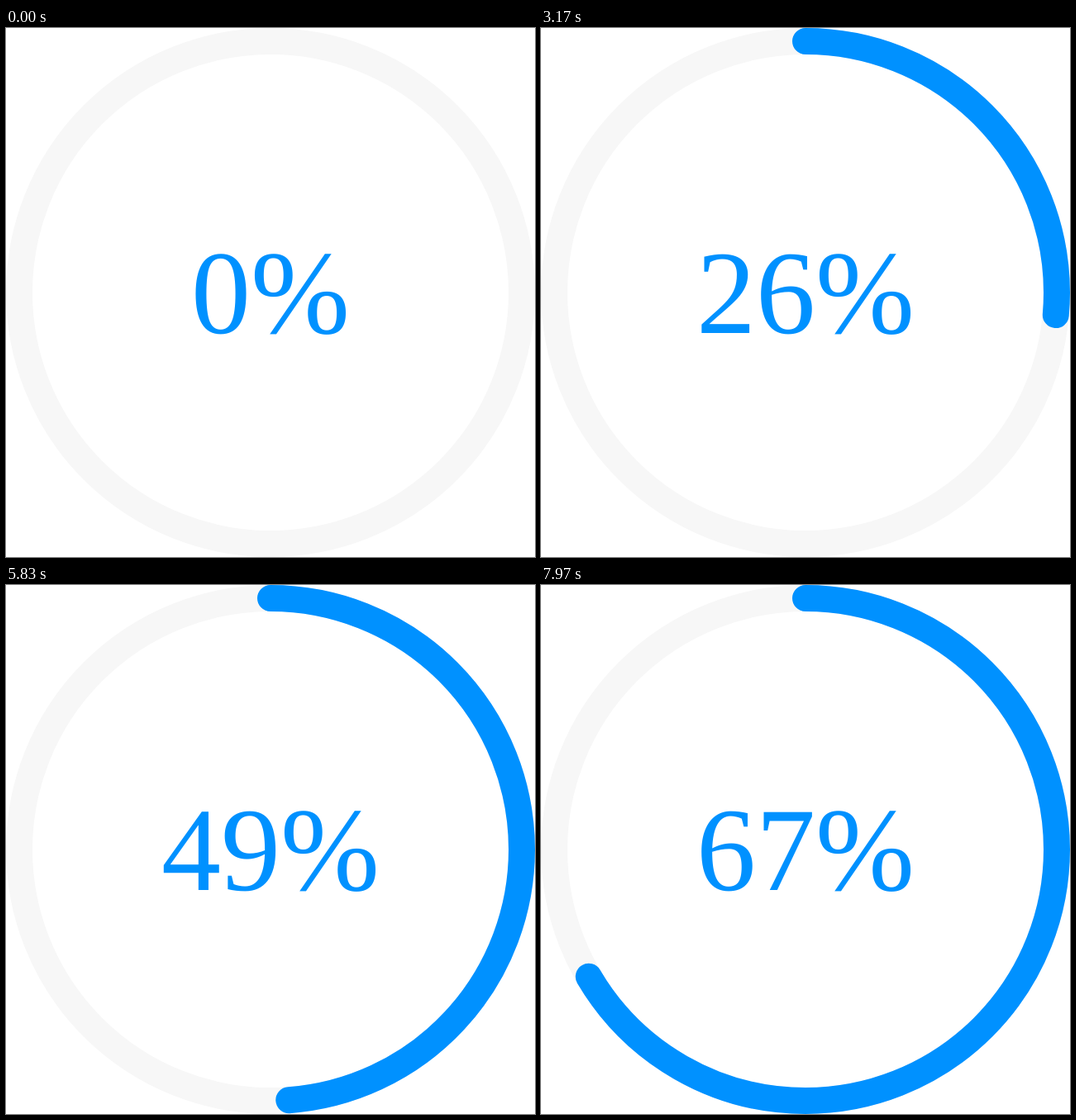
An HTML page for the animation above (8000 ms loop, 640x640 px).

```html
<!DOCTYPE html>
<html lang="en">
<head>
<meta charset="utf-8">
<title>Progress ring</title>
<style>
  html, body { margin: 0; height: 100%; overflow: hidden; background: #fff; }
  svg { display: block; width: 100%; height: 100%; }
  .ring { fill: none; stroke-width: 32; }
  .track { stroke: #f7f7f7; }
  .bar { stroke: #0091ff; stroke-linecap: round; }
  text {
    fill: #0091ff;
    font: 144px "Liberation Serif", serif;
    text-anchor: middle;
    text-rendering: geometricPrecision;
  }
</style>
</head>
<body>
<svg viewBox="0 0 640 640">
  <circle class="ring track" cx="320" cy="320" r="304"/>
  <path class="ring bar" id="bar" pathLength="100" visibility="hidden"
        d="M320 16A304 304 0 0 1 320 624A304 304 0 0 1 320 16"/>
  <text id="label" x="320" y="368.6">0%</text>
</svg>
<script>
  const LOOP = 8000;
  const LAST_STEP = 299;                   // the step at which the ring would be full
  const BEAT = 200;                        // five uneven steps per beat
  const OFFSETS = [0, 30, 70, 130, 170];

  const bar = document.getElementById('bar');
  const label = document.getElementById('label');

  function stepAt(time) {
    const inBeat = time % BEAT;
    const passed = OFFSETS.filter(offset => offset <= inBeat).length;
    return Math.floor(time / BEAT) * OFFSETS.length + passed - 1;
  }

  function draw() {
    const percent = stepAt(performance.now() % LOOP) / LAST_STEP * 100;
    bar.setAttribute('visibility', percent > 0 ? 'visible' : 'hidden');
    bar.setAttribute('stroke-dasharray', `${percent} 200`);
    label.textContent = `${Math.round(percent)}%`;
    requestAnimationFrame(draw);
  }
  draw();
</script>
</body>
</html>
```
